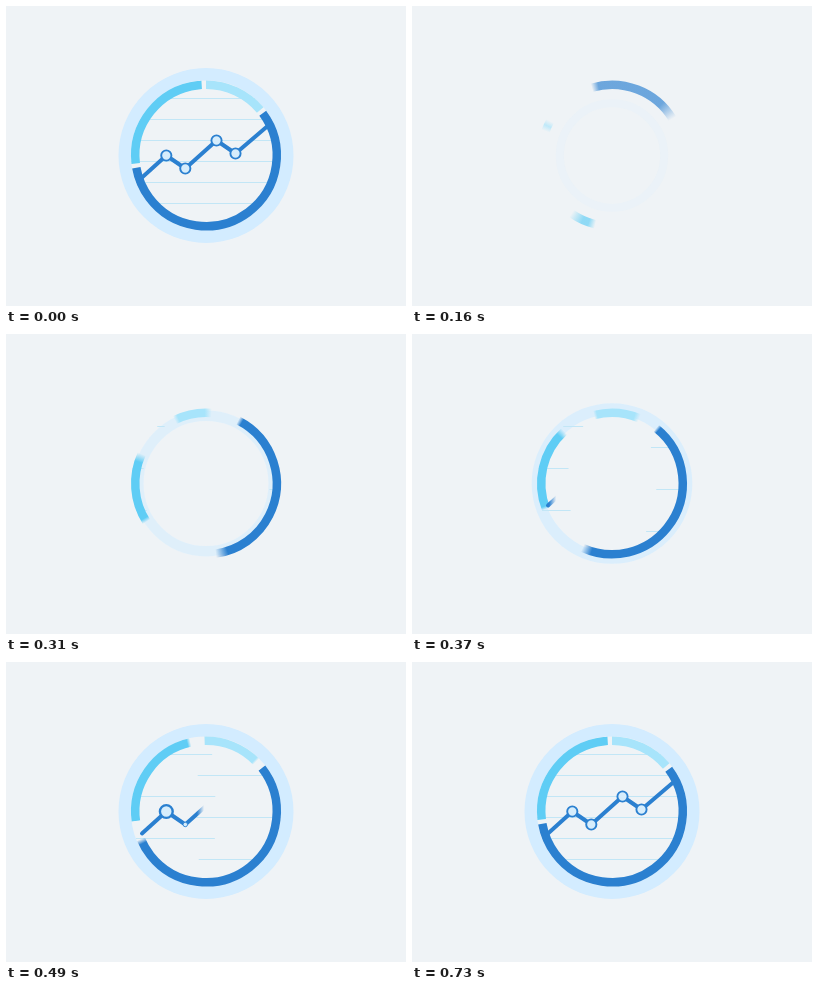
An HTML page with a canvas that plays this animation: 400x300 px, repeating every 2880 ms.

```html
<!DOCTYPE html>
<html lang="en">
<head>
<meta charset="utf-8">
<title>Chart badge</title>
<style>
html, body { margin: 0; width: 100%; height: 100%; overflow: hidden; background: #eff3f6; }
canvas { display: block; }
</style>
</head>
<body>
<canvas id="stage" width="400" height="300"></canvas>
<script>
const ctx = document.getElementById('stage').getContext('2d');
const LOOP = 2880, HOLD = 100, STEP = 30, SHUTTER = 16;
const CX = 200, CY = 149.5, R = 75;
const BG = '#eff3f6', HALO = '#d3ecff', GRID = '#c2e6f6', BLUE = [43, 128, 208];

// Angles in degrees clockwise from the top; sweep is how far the end travels.
const ARCS = [
  { from: 0, to: 50, sweep: 150, time: 485, rgb: [167, 228, 251] },
  { from: 263.5, to: 356.5, sweep: 188.5, time: 510, rgb: [95, 205, 245] },
  { from: 53.3, to: 260, sweep: 268, time: 510, rgb: BLUE }
];
const SPIN = 90, SPIN_TIME = 440;
const TREND = [[136, 171.5], [160.3, 149.5], [179.3, 162.5], [210.5, 134.5], [229.5, 147.5], [264, 118]];

const clamp = v => Math.max(0, Math.min(1, v));
const progress = (t, start, time) => clamp((t - start) / time);
const sineInOut = u => (1 - Math.cos(Math.PI * u)) / 2;
const rgba = (rgb, a) => `rgba(${rgb.join(',')},${a})`;
const rad = deg => (deg - 90) * Math.PI / 180;

function drawHalo(t) {
  const u = progress(t, 0, 390);
  const scale = 0.62 + 0.38 * sineInOut(u);
  ctx.globalAlpha = u;
  ctx.strokeStyle = HALO;
  ctx.lineWidth = 12.5 * scale;
  ctx.beginPath();
  ctx.arc(CX, CY, 81.25 * scale, 0, Math.PI * 2);
  ctx.stroke();
  ctx.globalAlpha = 1;
}

function drawGrid(t) {
  const p = sineInOut(progress(t, 122, 496));
  if (!p) return;
  ctx.fillStyle = GRID;
  for (let i = 0; i < 6; i++) {
    const y = 92 + 21 * i;
    const half = Math.sqrt(R * R - (y + 0.5 - CY) ** 2);
    const len = 2 * half * p;
    ctx.fillRect(i % 2 ? CX + half - len : CX - half, y, len, 1);
  }
}

function drawArc(arc, t) {
  const spinLeft = 1 - progress(t, 0, SPIN_TIME);
  const sweepLeft = 1 - progress(t, 0, arc.time);
  let a = arc.from - SPIN * spinLeft ** 2;
  let b = arc.to - arc.sweep * sweepLeft ** 2;
  if (b <= a) return;

  // Moving ends are smeared in proportion to their speed.
  let fadeA = 2 * SPIN * spinLeft / SPIN_TIME * SHUTTER;
  let fadeB = 2 * arc.sweep * sweepLeft / arc.time * SHUTTER;
  a -= fadeA / 2;
  b += fadeB / 2;
  const len = b - a;
  fadeA = Math.min(fadeA, len / 2);
  fadeB = Math.min(fadeB, len / 2);

  if (sweepLeft > 0) {
    const g = ctx.createConicGradient(rad(a), CX, CY);
    g.addColorStop(0, rgba(arc.rgb, fadeA > 0 ? 0 : 1));
    g.addColorStop(fadeA / 360, rgba(arc.rgb, 1));
    g.addColorStop((len - fadeB) / 360, rgba(arc.rgb, 1));
    g.addColorStop(len / 360, rgba(arc.rgb, 0));
    g.addColorStop(0.99, rgba(arc.rgb, 0));
    g.addColorStop(1, rgba(arc.rgb, fadeA > 0 ? 0 : 1));
    ctx.strokeStyle = g;
  } else {
    ctx.strokeStyle = rgba(arc.rgb, 1);
  }
  ctx.globalAlpha = clamp(t / 90);
  ctx.lineWidth = 8.5;
  ctx.beginPath();
  ctx.arc(CX, CY, 70.75, rad(a), rad(b));
  ctx.stroke();
  ctx.globalAlpha = 1;
}

// The x position reached after a share p of the trend's length.
function tipX(p) {
  const lens = TREND.slice(1).map(([x, y], i) => Math.hypot(x - TREND[i][0], y - TREND[i][1]));
  let left = p * lens.reduce((sum, n) => sum + n, 0);
  for (let i = 0; i < lens.length; i++) {
    if (left <= lens[i]) return TREND[i][0] + (TREND[i + 1][0] - TREND[i][0]) * left / lens[i];
    left -= lens[i];
  }
  return TREND[TREND.length - 1][0];
}

function drawTrend(t) {
  const u = progress(t, 260, 370);
  if (!u) return;
  if (u < 1) {
    const x = tipX(1 - (1 - u) ** 1.42);
    const g = ctx.createLinearGradient(x - 3.5, 0, x + 3.5, 0);
    g.addColorStop(0, rgba(BLUE, 1));
    g.addColorStop(1, rgba(BLUE, 0));
    ctx.strokeStyle = g;
  } else {
    ctx.strokeStyle = rgba(BLUE, 1);
  }
  ctx.lineWidth = 4;
  ctx.lineCap = ctx.lineJoin = 'round';
  ctx.beginPath();
  TREND.forEach(([x, y]) => ctx.lineTo(x, y));
  ctx.stroke();
  ctx.lineCap = 'butt';
}

function popScale(age) {
  const peak = 1.27;
  if (age < 75) return peak * sineInOut(clamp(age / 75));
  return peak - (peak - 1) * sineInOut(progress(age, 75, 75));
}

function drawDots(t) {
  TREND.slice(1, -1).forEach(([x, y], i) => {
    const s = popScale(t - 320 - 40 * i);
    if (s <= 0) return;
    ctx.fillStyle = '#d6edfc';
    ctx.strokeStyle = rgba(BLUE, 1);
    ctx.lineWidth = 1.9 * s;
    ctx.beginPath();
    ctx.arc(x, y, 5.1 * s, 0, Math.PI * 2);
    ctx.fill();
    ctx.stroke();
  });
}

function draw(ms) {
  const now = ms % LOOP;
  // The finished badge is held briefly, then it is rebuilt in even steps.
  const t = now < HOLD ? LOOP : Math.floor((now - HOLD) / STEP) * STEP;
  ctx.fillStyle = BG;
  ctx.fillRect(0, 0, 400, 300);
  if (t === 0) return;
  drawHalo(t);
  drawGrid(t);
  ARCS.forEach(arc => drawArc(arc, t));
  drawTrend(t);
  drawDots(t);
}

const begin = performance.now();
function tick() {
  draw(performance.now() - begin);
  requestAnimationFrame(tick);
}
tick();
</script>
</body>
</html>
```
